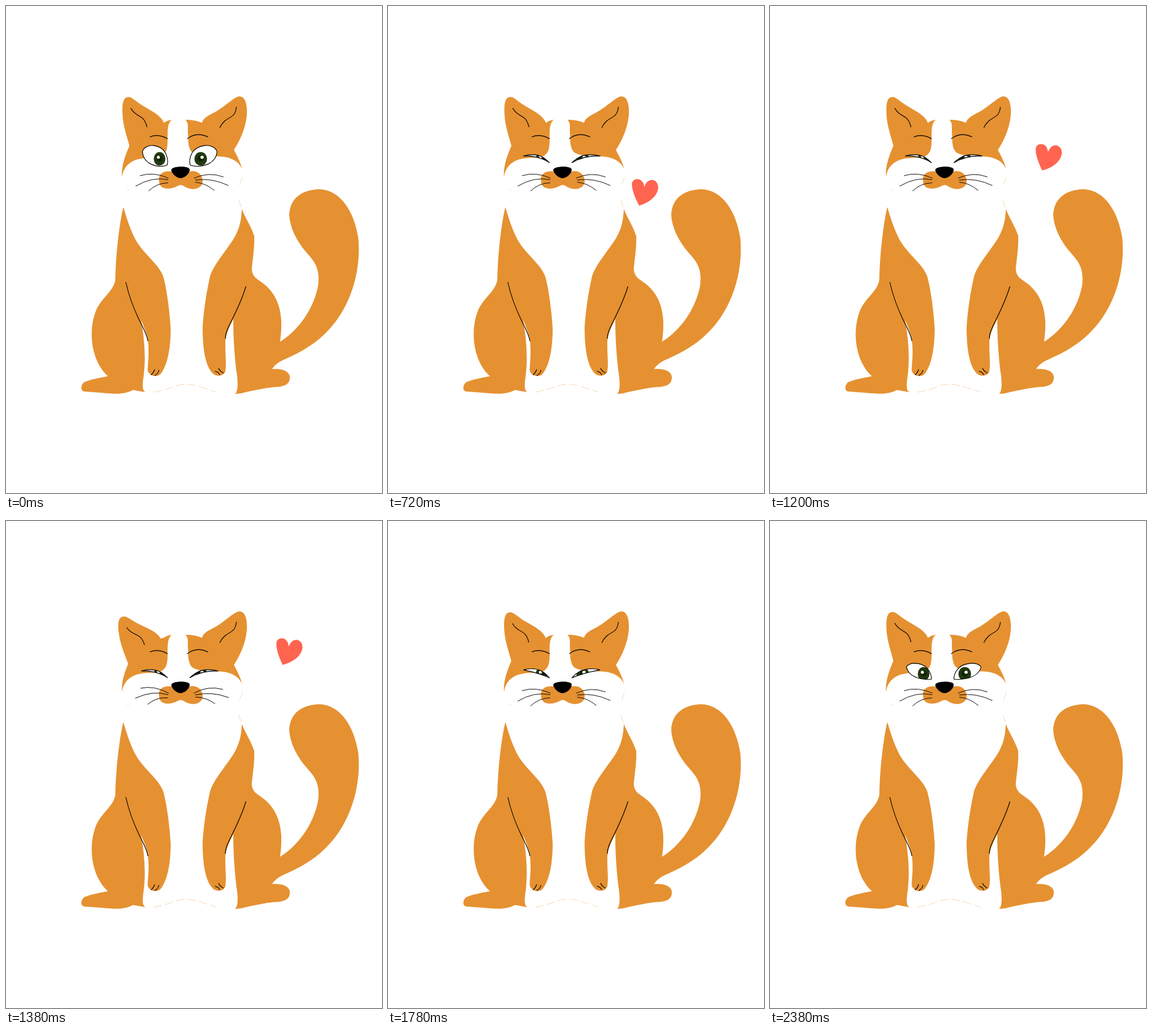
An HTML page for the animation above (2400 ms loop, 612 px wide and 792 px high).

```html
<!DOCTYPE html>
<html lang="en">
<head>
<meta charset="utf-8">
<title>Cat with heart</title>
<style>
  html, body { margin: 0; width: 100%; height: 100%; overflow: hidden; background: #fff; }
  svg { display: block; width: 100vw; height: 100vh; }
  .fur { fill: #e59131; }
  .line { fill: none; stroke: #000; stroke-width: 1.1; }
  .thin { fill: none; stroke: #000; stroke-width: .9; }
  .faint { fill: none; stroke: #e59131; stroke-width: .7; opacity: .5; }
  .love { fill: #ff6450; }
</style>
</head>
<body>
<svg viewBox="0 0 612 792">
  <defs>
    <clipPath id="lidClip"><path id="lidShape"/></clipPath>
  </defs>

  <!-- body, left and right halves -->
  <path class="fur" d="M191,327 C186,347 179,395 178,445 C175,465 153,476 145.500,498 C133,532 140,579 166,602
    C150,605 135,608 127,612 C121,617 121,626 128,627 C150,628 178,632 188,630 C198,629 203,626 207,624.500
    L229,628.500 C221,628 222,615 224,602 C228,570 225,540 220,511 C227,528 231,538 231.500,550 C233,568 231,580 230.500,592
    C232,602 246,605 252,598 C262,585 268,560 268,525 C266,490 261,458 256,440 C249,420 225,404 212,382 C201,362 195,340 191,327Z"/>
  <path class="fur" d="M384,330 C388,342 399,358 404,374 C405,392 401,415 400,428 C401,441 409,444 417,450
    C443,469 453,499 446,546 C475,528 500,495 508,455 C511,430 505,418 490,402 C473,383 462,360 461,340
    C462,312 482,299 510,298 C545,299 567,335 573.500,378 C578,428 563,482 532,519 C507,549 481,562 455,574
    C445,578 438,583 433,590.500 C445,589 462,592 462,604 C462,616 452,619 440,619.500 C420,621 395,627 382,630 L372,631
    C378,629 378,611 375,594 C371,560 370,535 370,509 C361,528 357,535 357,552 C357,570 359,580 357,594
    C355,602 342,604 336,597 C325,585 320,560 320,522 C322,490 328,458 332,440 C338,420 361,395 372,376 C383,357 383,340 384,330Z"/>
  <g class="line">
    <path d="M195,449 C199,467 208,493 218.500,514 C225,527 230,536 231,545"/>
    <path d="M390.500,456 C385,475 375,496 366,514 C360,526 357,533 357,541"/>
    <path d="M236,600 Q240,597 242,591 M242,601 Q248,598 249,592 M340,594 Q346,595 348,600 M346,589 Q348,594 354,597"/>
  </g>
  <g class="faint">
    <path stroke-dasharray="14 5" d="M240,628 Q262,624 275,618 Q293,612 315,619 Q330,624 343,628"/>
    <path d="M197,298 L200,300 M379,316 L383,327 M385,279 L380,291"/>
  </g>

  <!-- head -->
  <path class="fur" d="M257,190 Q262,186 270,185 C263,190 263,200 263,214 C263,230 263,240 250,245.500
    C238,248 222,245 207,252 C195,258 190,268 189,278 C187,262 194,243 201,227 L220,196Z"/>
  <path class="fur" d="M292,185 Q308,185 319,190 C321,181 331,178 342,171.500 C358,162 370,149 379,147
    C389,146 393,159 392,177 C390,200 380,220 371,234 C376,244 382,254 384,265 C377,249 362,245 344,244.500
    C325,245 309,243 302,237 C295,228 297,215 296,203 C296,195 297,190 292,185Z"/>
  <g id="ear">
    <path class="fur" d="M257,190 C252,178 239,172 224,163 C212,156 206,148 199,148 C190,148 189,161 189.500,174
      C190,194 197,212 201,228 L240,216Z"/>
    <path class="line" d="M203,166 C212,183 224,174 229.500,197"/>
  </g>
  <path class="line" d="M375,164 C373,186 358,177 348,198 M234,213 Q248,207 263,216 M295,216 Q310,204 329,213"/>

  <g id="eyes"></g>

  <path class="fur" d="M249,283 C248,272 258,268 268,269 L300,269 C314,266 321,278 320,286 C319,297 305,300 296,296
    C290,294 288,291 284,291 C279,292 274,297 263,297 C252,297 249,290 249,283Z"/>
  <path d="M269,267 C268,260 299,259 299,266 C299,273 290,280 284,280 C278,280 270,273 269,267Z"/>
  <path id="whiskL" class="thin" d="M218,276 Q240,269 264.500,280 M211,293 Q238,277 264,282.500 M232,301 Q245,288 264,287.500"/>
  <path id="whiskR" class="thin" d="M354,278 Q330,269 306,280 M362,292 Q335,279 308,283 M339,300 Q325,288 308,286.500"/>

  <path id="heart" class="love" d="M-9.500,22 C-16,10 -22,-4 -21.500,-14 C-20.500,-21 -12,-23 -6.500,-19 C-3,-16 -1.500,-12 -1.500,-8
    C1,-15 5,-20 11.500,-20 C19,-19 23,-11 20.500,-3 C17,10 3,18 -9.500,22Z"/>
  <path id="burst" class="love"/>
</svg>
<script>
const LOOP = 2400, STEP = 20;
const $ = id => document.getElementById(id);
const clamp = v => Math.max(0, Math.min(1, v));
const part = (t, a, b) => clamp((t - a) / (b - a));
const smooth = u => u * u * (3 - 2 * u);

// Lid outlines: start point, then three cubic segments
const SHUT = [220,244, 230,241, 243,241, 250,245, 256,248, 260,252, 263,255, 254,249, 240,243, 220,244];
const HALF = [222,237, 234,233, 250,238, 257,246, 260,249, 262,253, 263,256, 250,254, 228,252, 222,237];
const OPEN = [222,237, 226,222, 253,224, 260,240, 263,247, 264,254, 262,259, 250,263, 224,260, 222,237];
const HALF_AT = 0.41;

// Sparks: angle in degrees, reach
const RAYS = [[-109,31], [-80,29.5], [-52,28], [-15,30.5], [14,30.5], [51,20], [80,30], [125,33], [168,23], [197,31.5]];

const FLIP = 'matrix(-1.085 0 0 1 584.4 0)';
const iris = x => `<ellipse cx="${x}" cy="248.500" rx="9.500" ry="11" fill="#20380f"/>
  <circle cx="${x}" cy="248" r="5" fill="#14230a"/><circle cx="${x - 2}" cy="246" r="2.500" fill="#fff"/>`;
const eye = x => `<path class="lid" fill="#fff"/><g clip-path="url(#lidClip)">${iris(x)}</g>
  <path class="lid line" vector-effect="non-scaling-stroke"/>`;
$('eyes').innerHTML = `<g>${eye(250)}</g><g transform="${FLIP}">${eye(246.5)}</g>`;
const lids = document.querySelectorAll('.lid');

function lidPath(open) {
  const low = open < HALF_AT;
  const [a, b] = low ? [SHUT, HALF] : [HALF, OPEN];
  const u = low ? open / HALF_AT : (open - HALF_AT) / (1 - HALF_AT);
  const p = a.map((v, i) => (v + (b[i] - v) * u).toFixed(2));
  return `M${p.slice(0, 2)}C${p.slice(2)}Z`;
}

function eyeOpen(t) {
  if (t < 220) return 1;
  if (t <= 400) return 1 - (t - 200) / 200;
  return Math.max(0, (t - 1670) / 1000);
}

function rayPath(inner, grow) {
  return RAYS.map(([deg, reach]) => {
    const c = Math.cos(deg * Math.PI / 180), s = Math.sin(deg * Math.PI / 180);
    const at = (r, w) => `${(457 + r * c - w * s).toFixed(2)},${(207 + r * s + w * c).toFixed(2)}`;
    const a = inner, b = Math.max(a, reach * grow), len = b - a;
    const near = a + len * 0.4, w = Math.min(3.8, len * 0.22);
    return `M${at(a, 0)}C${at(near, w)} ${at(b, w)} ${at(b, 0)}C${at(b, -w)} ${at(near, -w)} ${at(a, 0)}Z`;
  }).join('');
}

function show(el, on) { el.setAttribute('visibility', on ? 'visible' : 'hidden'); }

function draw(t) {
  const d = lidPath(eyeOpen(t));
  $('lidShape').setAttribute('d', d);
  lids.forEach(l => l.setAttribute('d', d));

  const twitch = t < 1490 ? smooth(part(t, 1220, 1490)) : Math.pow(1 - part(t, 1490, 1850), 1.9);
  $('ear').setAttribute('transform', `rotate(${-8 * twitch} 278 244)`);

  const lift = 5 * Math.sin(Math.PI * part(t, 1200, 1560)) ** 2;
  $('whiskL').setAttribute('transform', `rotate(${lift} 264 283)`);
  $('whiskR').setAttribute('transform', `rotate(${-lift} 307 284)`);

  const s = t - 600;
  show($('heart'), t >= 600 && t < 1430);
  $('heart').setAttribute('transform',
    `translate(${406.3 + 0.107 * s - 4.735e-5 * s * s} ${309.5 - 0.044 * s - 1.03e-4 * s * s}) rotate(${s / 260})`);

  const on = t >= 1430 && t < 1780;
  show($('burst'), on);
  if (on) {
    const grow = t < 1600 ? 0.3 + 0.7 * part(t, 1430, 1600) : 1 + 0.2 * part(t, 1600, 1720);
    const inner = t < 1600 ? 3 + 7 * part(t, 1430, 1600) : 10 + 26 * part(t, 1600, 1780);
    $('burst').setAttribute('d', rayPath(inner, grow));
  }
}

const start = performance.now();
function frame() {
  const t = Math.max(0, performance.now() - start) % LOOP;
  draw(Math.floor(t / STEP) * STEP);
  requestAnimationFrame(frame);
}
frame();
</script>
</body>
</html>
```
